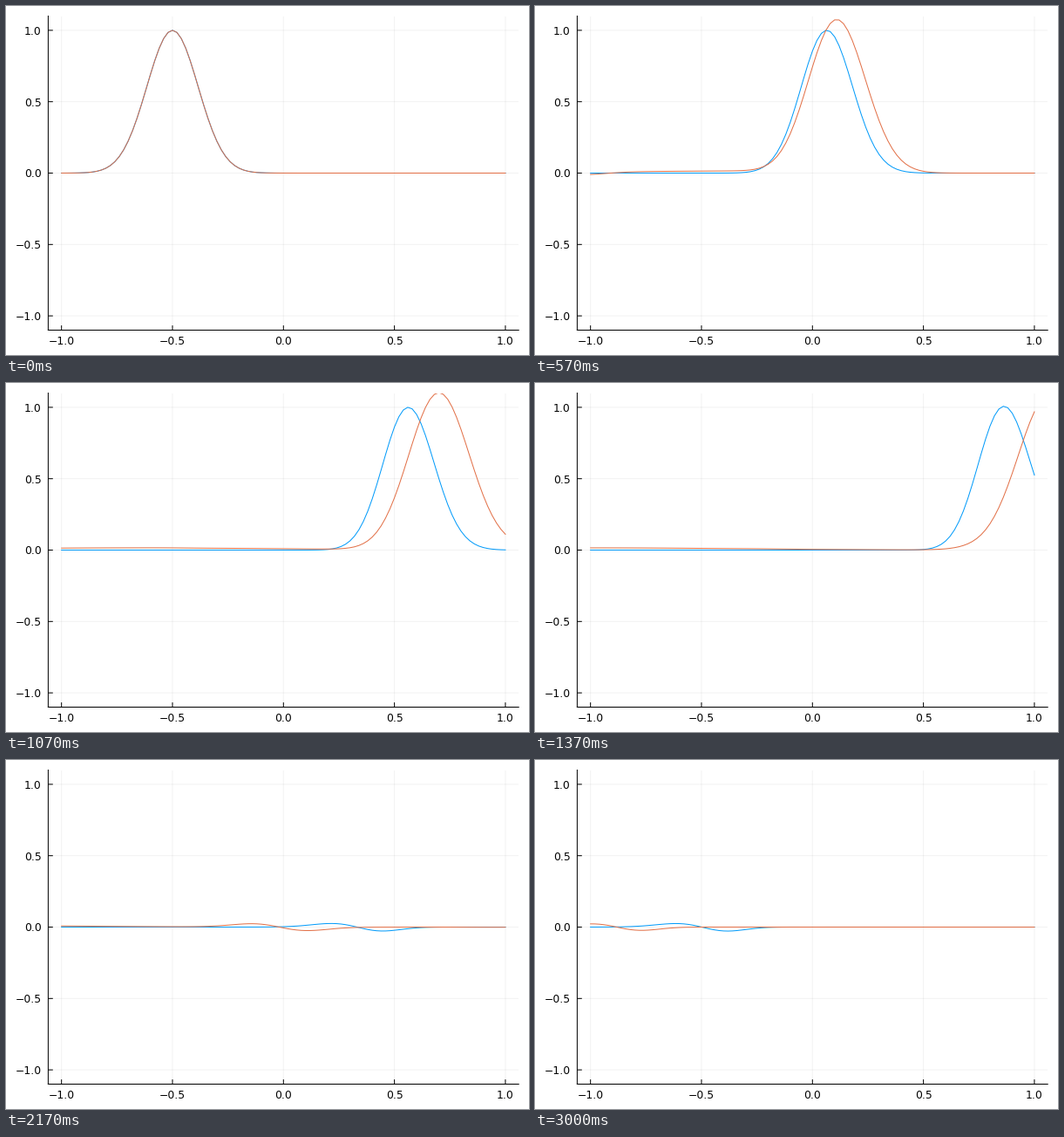
Animation, 600 px wide and 400 px high, one loop 3030 ms. Source, as a matplotlib script:

```python
import numpy as np
import matplotlib.pyplot as plt
from matplotlib.animation import FuncAnimation

W, H, DPI = 600, 400, 100
PX = 72 / DPI                 # one pixel in points
LOOP_MS, TICK_MS = 3030, 10
FPS, STEPS, SUB = 30, 91, 10  # pictures per second, pictures, substeps each
SHARP = 37.5                  # pulse is exp(-SHARP * distance^2)

x = np.linspace(-1, 1, 101)
dx = x[1] - x[0]

# Stiffness of the two media: uniform, and a smooth step
stiff = np.array([np.ones_like(x), 1.25 + 0.25 * np.tanh(2 * x)])
speed = np.sqrt(stiff)


def rate(state):
    """Wave equation with one-sided absorbing ends."""
    u, v = state
    du, dv = v.copy(), np.zeros_like(v)
    dv[:, 1:-1] = stiff[:, 1:-1] * (u[:, 2:] - 2 * u[:, 1:-1] + u[:, :-2]) / dx**2
    du[:, 0] = speed[:, 0] * (u[:, 1] - u[:, 0]) / dx
    du[:, -1] = -speed[:, -1] * (u[:, -1] - u[:, -2]) / dx
    return np.array([du, dv])


def rk4(state, dt):
    a = rate(state)
    b = rate(state + dt / 2 * a)
    c = rate(state + dt / 2 * b)
    d = rate(state + dt * c)
    return state + dt / 6 * (a + 2 * b + 2 * c + d)


def solve():
    pulse = np.exp(-SHARP * (x + 0.5) ** 2)
    slope = -2 * SHARP * (x + 0.5) * pulse
    state = np.array([np.array([pulse, pulse]), -stiff * slope])
    waves = [state[0]]
    for _ in range(STEPS - 1):
        for _ in range(SUB):
            state = rk4(state, 1 / (FPS * SUB))
        waves.append(state[0])
    return waves


waves = solve()

plt.rcParams.update({"font.family": "DejaVu Sans", "path.snap": False})
fig = plt.figure(figsize=(W / DPI, H / DPI), dpi=DPI, facecolor="white")
left, right, top, bottom = 48.4, 588.2, 11.5, 371.5
ax = fig.add_axes([left / W, 1 - bottom / H, (right - left) / W, (bottom - top) / H])
x0, y0 = -1.06, -1.1
ax.set(xlim=(x0, -x0), ylim=(y0, -y0))

ticks = np.linspace(-1, 1, 5)
labels = [f"{t:.1f}".replace("-", "\u2212") for t in ticks]
ax.set_xticks(ticks, labels)
ax.set_yticks(ticks, labels)
ax.tick_params(length=0, labelsize=8.9)
ax.tick_params(axis="x", pad=4.6)
ax.tick_params(axis="y", pad=5.4)
ax.grid(color="black", alpha=0.05, linewidth=PX)
ax.set_axisbelow(True)
for side in ("top", "right"):
    ax.spines[side].set_visible(False)
for side in ("left", "bottom"):
    ax.spines[side].set_linewidth(PX)

# inward tick marks, drawn as plain lines so they stay off the pixel grid
tick_px = 5.4
ax.vlines(ticks, y0, y0 - 2 * y0 * tick_px / (bottom - top), "black", linewidth=PX)
ax.hlines(ticks, x0, x0 - 2 * x0 * tick_px / (right - left), "black", linewidth=PX)

lines = [ax.plot(x, u, color=color, linewidth=PX, zorder=3)[0]
         for u, color in zip(waves[0], ("#009AFA", "#E26F46"))]


def draw(n):
    # pictures change on the 10 ms tick nearest to each 1/30 s
    step = (6 * n + 3) // 20
    for line, u in zip(lines, waves[step]):
        line.set_ydata(u)
    return lines


anim = FuncAnimation(fig, draw, frames=LOOP_MS // TICK_MS, interval=TICK_MS,
                     repeat=True, repeat_delay=0, blit=False)
plt.show()
```
